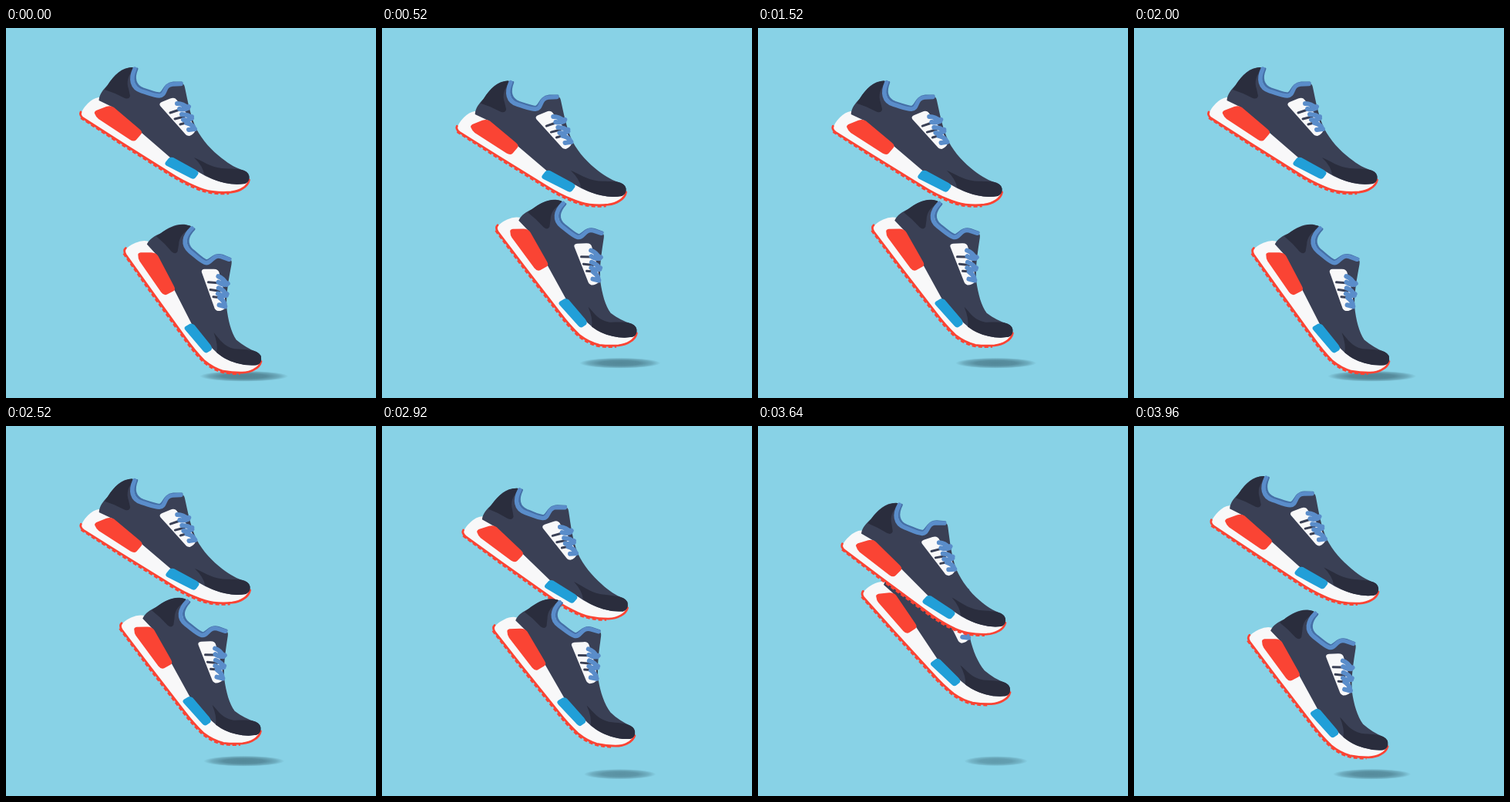
Animation of 480x480 px, one loop 4000 ms. Source, as an HTML page with a canvas:

```html
<!DOCTYPE html>
<html lang="en">
<head>
<meta charset="utf-8">
<title>Running shoes</title>
<style>
  html, body { margin: 0; width: 100%; height: 100%; overflow: hidden; background: #88d2e6; }
  canvas { display: block; width: 480px; height: 480px; }
</style>
</head>
<body>
<canvas id="stage" width="480" height="480"></canvas>
<script>
const ctx = document.getElementById('stage').getContext('2d');
const STRIDE = 1000, STEP = 40, BACK_LIFT = 17;
const JOINT = { x: 262, y: 190 };
const AXIS = 25 * Math.PI / 180;
const C = {
  sky: '#88d2e6', navy: '#3a4055', dark: '#2a2d3d', white: '#f8f8f9',
  red: '#fa4434', cyan: '#219fd8', lace: '#5a8dca', lining: '#456fa6'
};

// Stride keys: phase, joint x, joint y, body angle, toe angle
const KEYS = [
  [0, 278, 422.4, 22, 3.5],
  [0.02, 276.9, 405.7, 20.2, 0.2],
  [0.32, 270.2, 292.6, 9.9, 6.8],
  [0.46, 263.8, 222.9, 1.1, 2.3],
  [0.5, 262, 207, 0, 0],
  [0.52, 263, 206.7, -0.5, -0.9],
  [0.82, 273.5, 352.1, 16.2, 9],
  [0.96, 276.3, 404.7, 20.4, 4.3]
];

const SOLE = 'M97 109 Q95 113 100 117 L150 149 L212 188 Q229 199 245 205.5 Q257 211 268 212.5 Q280 214 292 213 Q301 212 307 208 Q314 204 315.5 197';
const TREAD = 'M98 115 L150 149 L212 188 Q229 199 245 205.5 Q257 211 268 212.5 Q280 214 290 213';
const COLLAR = 'M167 53 C161 66 163 78 176 82 C186 85 192 88 199 88 C208 88 204 74 216 73 L227 72.5';

// Each part: path, colour, stroke width (0 means fill)
const PARTS = [
  ['M97 112 Q99 105 106 98 Q113 91 120 90 L128 92 L200 145 L250 180 L280 188 L315 194 Q317 203 307 208 Q301 212 292 213 Q280 214 268 212.5 Q257 211 245 205.5 Q229 199 212 188 L150 149 L100 117 Z', C.white, 0],
  [TREAD, C.red, 3, [5, 3], -0.8, 1.4],
  [SOLE, C.red, 2.8],
  ['M120.5 94 C121 86 126 80 132 74 C140 61 150 51 164 51 L168 53 C162 66 164 77 177 81 C187 84 192 87 199 87 C208 87 204 73 216 72 L228 72 Q231 72 232 77 C236 96 239 113 247 131 C255 146 267 159 280 169 C290 177 299 182 309 185 Q316 188 315.5 195 Q315 200 310 202 Q297 204 284 201 Q266 197 250 187 L213 168 L176 136 L137 102 Z', C.navy, 0],
  ['M128 80 C138 64 148 52 164 51 L166 53 C158 62 156 70 159 79 L161 88 Q160 93 154 91 Q141 84 128 80 Z', C.dark, 0],
  ['M244 168 C256 173 264 180 280 182 C292 183 301 182 309 185 Q316 188 315.5 195 Q315 200 310 202 Q297 204 284 201 Q270 198 257 190 Q256 180 244 168 Z', C.dark, 0],
  ['M115 111 Q114 109 117 107 L130 102 Q136 100 140 103 L173 131 Q178 135 175 138 L169 145 Q166 148 161 145 L120 118 Q117 116 115 111 Z', C.red, 0],
  ['M207 174 L211 169 Q213 167 217 168 L246 184 Q251 187 249 190 L246 194 Q244 197 240 195 L209 179 Q205 177 207 174 Z', C.cyan, 0],
  ['M170 53 C165 65 167 75 178 79 C188 82 194 85 200 85 C205 83 205 72 217 71 L228 71', C.lining, 3],
  [COLLAR, C.lace, 5.4],
  ['M200 101 Q198 98 202 96 L213 91.5 Q219 89 222 94 L238 116 L246 132 Q244 138 238 140 Q234 140 232 137 Z', C.white, 0],
  ['M213 110 L225 106 M219 118 L231 115 M226 125 L237 122', C.navy, 3],
  ['M222 98 Q230 98 236 104 M225 105 Q234 107 237 102 M228 112 Q237 112 241 117 M230 119 Q239 121 241 115 M234 123 Q242 125 244 130 M237 132 L245 131', C.lace, 6]
];

const rad = deg => deg * Math.PI / 180;
const clamp = v => Math.max(0, Math.min(1, v));

function keyAt(i) {
  const n = KEYS.length, turn = Math.floor(i / n), key = KEYS[i - turn * n].slice();
  key[0] += turn;
  return key;
}

function tangent(i, col) {
  const a = keyAt(i - 1), b = keyAt(i), c = keyAt(i + 1);
  const h0 = b[0] - a[0], h1 = c[0] - b[0];
  const d0 = (b[col] - a[col]) / h0, d1 = (c[col] - b[col]) / h1;
  if (d0 * d1 <= 0) return 0;
  return 3 * (h0 + h1) / ((2 * h1 + h0) / d0 + (h1 + 2 * h0) / d1);
}

// Monotone cubic through the stride keys
function poseAt(u) {
  let i = KEYS.length - 1;
  while (KEYS[i][0] > u) i--;
  const a = keyAt(i), b = keyAt(i + 1), h = b[0] - a[0], t = (u - a[0]) / h;
  const ease = t * t * (3 - 2 * t);
  const [x, y, body, toe] = [1, 2, 3, 4].map(col =>
    a[col] + (b[col] - a[col]) * ease +
    h * t * (1 - t) * ((1 - t) * tangent(i, col) - t * tangent(i + 1, col)));
  return { x, y, body: rad(body), toe: rad(toe) };
}

// Blends two rotations around the ball of the foot
function bender(pose) {
  const cb = Math.cos(pose.body), sb = Math.sin(pose.body);
  const ct = Math.cos(pose.toe), st = Math.sin(pose.toe);
  return (px, py) => {
    const x = px - JOINT.x, y = py - JOINT.y;
    const k = clamp((x * Math.cos(AXIS) + y * Math.sin(AXIS) + 24) / 48);
    const w = k * k * (3 - 2 * k);
    const c = cb + (ct - cb) * w, s = sb + (st - sb) * w;
    return [pose.x + x * c - y * s, pose.y + x * s + y * c];
  };
}

function drawShoe(u, lift) {
  const pose = poseAt(u);
  pose.y -= lift;
  const bend = bender(pose);
  for (const [path, color, width, dash = [], dx = 0, dy = 0] of PARTS) {
    const bent = path.replace(/([\d.]+) ([\d.]+)/g, (m, x, y) =>
      bend(+x + dx, +y + dy).map(v => v.toFixed(2)).join(' '));
    const shape = new Path2D(bent);
    if (width) {
      ctx.strokeStyle = color;
      ctx.lineWidth = width;
      ctx.setLineDash(dash);
      ctx.lineCap = dash.length ? 'butt' : 'round';
      ctx.lineJoin = 'round';
      ctx.stroke(shape);
    } else {
      ctx.fillStyle = color;
      ctx.fill(shape);
    }
  }
}

function drawShadow(u, lift) {
  const d = Math.min(u, 1 - u);
  const alpha = clamp((0.2 - d) / 0.02) * (1 - 2 * d);
  if (alpha <= 0) return;
  const half = 53.5 - 95 * d + 3 * clamp(1 - d / 0.02);
  const g = ctx.createRadialGradient(0, 0, 0, 0, 0, 1);
  g.addColorStop(0, 'rgba(75,124,140,0.9)');
  g.addColorStop(0.5, 'rgba(75,124,140,0.82)');
  g.addColorStop(0.8, 'rgba(75,124,140,0.45)');
  g.addColorStop(1, 'rgba(75,124,140,0)');
  ctx.save();
  ctx.globalAlpha = alpha;
  ctx.translate(308.7, 451.7 - lift);
  ctx.scale(half + 1, 7 - 4 * d);
  ctx.fillStyle = g;
  ctx.beginPath();
  ctx.arc(0, 0, 1, 0, Math.PI * 2);
  ctx.fill();
  ctx.restore();
}

function draw(now) {
  const u = Math.floor(now / STEP) * STEP % STRIDE / STRIDE;
  const back = (u + 0.5) % 1;
  ctx.fillStyle = C.sky;
  ctx.fillRect(0, 0, 480, 480);
  drawShadow(back, BACK_LIFT);
  drawShadow(u, 0);
  drawShoe(back, BACK_LIFT);
  drawShoe(u, 0);
}

let start;
function tick() {
  const now = performance.now();
  if (start === undefined) start = now;
  draw(now - start);
  requestAnimationFrame(tick);
}
tick();
</script>
</body>
</html>
```
